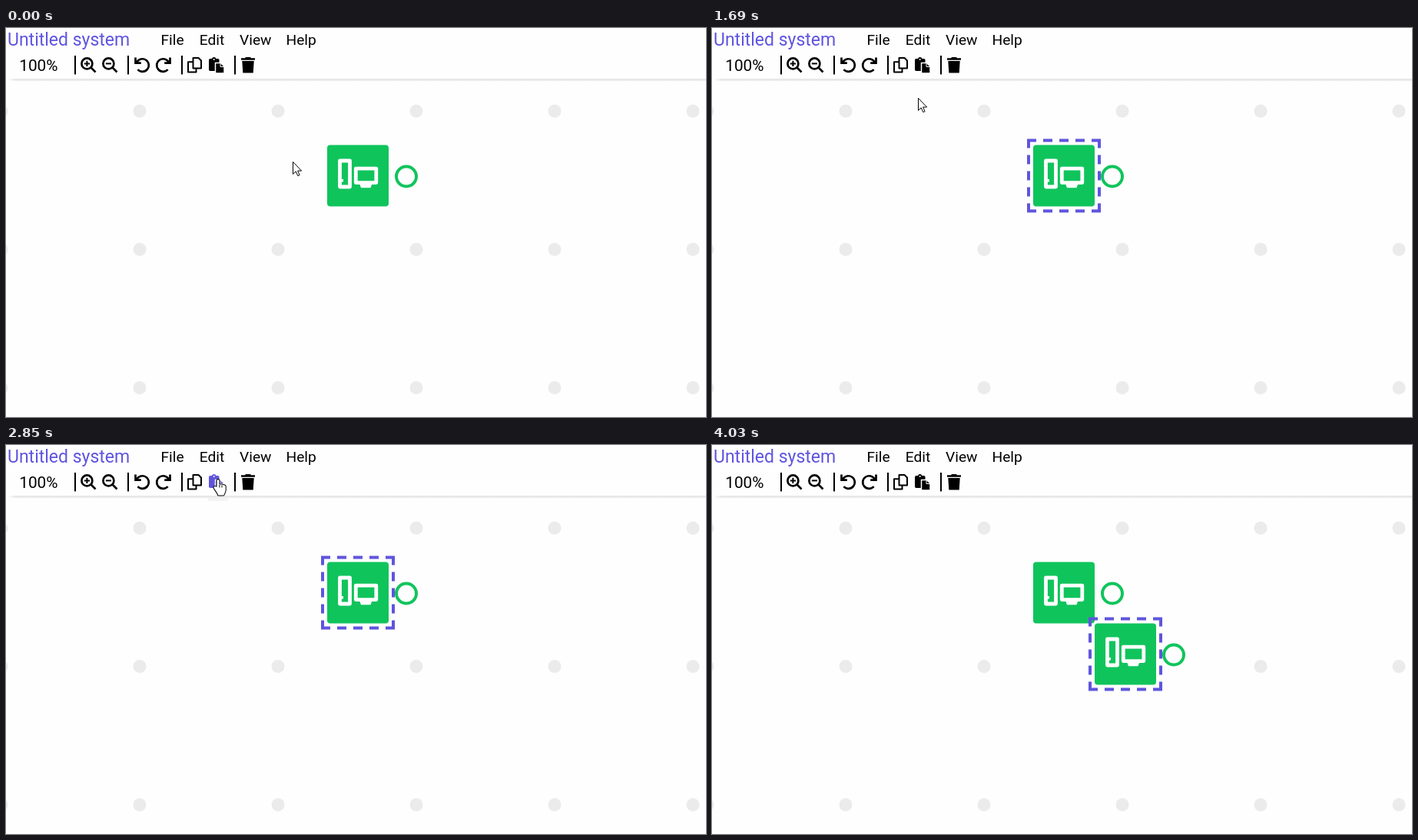
Recreate the animation shown at these times as an HTML page. Size 911 by 507 pixels, loop 5030 ms.

```html
<!DOCTYPE html>
<html lang="en">
<head>
<meta charset="utf-8">
<title>Copy and paste a component</title>
<style>
  html, body { margin: 0; width: 100%; height: 100%; overflow: hidden; background: #fefefe; }
  svg { display: block; }
  text { font: 19.2px Roboto, Arial, sans-serif; }
  .title { font-size: 23px; fill: #5f55e0; }
  .zoom { font-size: 20.8px; }
  .line { fill: none; stroke: currentColor; stroke-width: 2; stroke-linejoin: round; }
  .bold { stroke-width: 2.7; stroke-linejoin: miter; }
  .ink, .paper { fill: #fff; stroke: #000; stroke-width: 5; stroke-linecap: round; stroke-linejoin: round; }
  .paper { stroke: #fff; stroke-width: 3; }
  #move .ink { stroke-width: 4; }
  #move .paper { stroke-width: 2; }
</style>
</head>
<body>
<svg width="911" height="507">
  <defs>
    <pattern id="dots" x="84" y="18.3" width="180" height="180.3" patternUnits="userSpaceOnUse">
      <circle cx="90" cy="90" r="8.5" fill="#ebebeb"/>
    </pattern>
    <linearGradient id="edge">
      <stop stop-color="#e8e8e8" stop-opacity="0"/>
      <stop offset=".01" stop-color="#e8e8e8"/>
    </linearGradient>
    <g id="lens" class="line bold">
      <circle cx="8.4" cy="8.4" r="7"/>
      <path d="M13 13l6.5 6.500"/>
    </g>
    <path id="turn" class="line bold" d="M4.400 16.200A8.300 8.300 0 1 0 3.200 6.600M1.500 .6V7.600H8.800"/>
    <g id="node">
      <rect x="418" y="152.500" width="80" height="80" rx="4" fill="#10c45c"/>
      <g fill="none" stroke="#fff" stroke-width="4.800" stroke-linejoin="round">
        <path d="M434.500 173h13v34h-13z"/>
        <path d="M455.300 183.200h26.500v18.400h-26.500z"/>
      </g>
      <path d="M436 197h3v3.500h-3zM460.500 204h15.500l-1.500 4.300h-12.500z" fill="#fff"/>
    </g>
    <circle id="port" cx="521" cy="193.500" r="13" fill="#fefefe" stroke="#10c45c" stroke-width="4"/>
    <path id="frame" d="M410 146.500h96M410 238.500h96M412 144.500v96M504 144.500v96"
          fill="none" stroke="#5f55dd" stroke-width="4" stroke-dasharray="12 9"/>
    <path id="fingers" d="M0 2.400V13L-4 11.500 1 19V20H6.500L8.200 15V10L4 9H0"/>
    <path id="arrows" d="M-9 0H9M0-9V9M-2.500-6.500 0-9 2.500-6.500M-2.500 6.500 0 9 2.500 6.500M-6.500-2.500-9 0-6.500 2.500M6.500-2.500 9 0 6.500 2.500"/>
  </defs>

  <rect width="911" height="507" fill="url(#dots)"/>

  <text class="title" x="2" y="23">Untitled system</text>
  <text x="201.500" y="22">File</text>
  <text x="251.800" y="22">Edit</text>
  <text x="304" y="22">View</text>
  <text x="364.500" y="22">Help</text>
  <text class="zoom" x="17.200" y="56">100%</text>
  <path d="M90 36v24.500M159 36v24.500M229 36v24.500M298 36v24.500" stroke="#000" stroke-width="2"/>
  <rect x="3" y="66" width="908" height="2.800" fill="url(#edge)"/>

  <g transform="translate(97 38)"><use href="#lens"/><path class="line" d="M4.800 8.400h7.200M8.400 4.800v7.200"/></g>
  <g transform="translate(125 38)"><use href="#lens"/><path class="line" d="M4.800 8.400h7.200"/></g>
  <use href="#turn" transform="translate(167 38)"/>
  <use href="#turn" transform="translate(215 38) scale(-1 1)"/>

  <rect id="copyBg" x="235" y="69" width="32" height="4" fill="#f4f4f4"/>
  <path id="copy" class="line" transform="translate(236 38)"
        d="M7.500 1H14.500L18 4.500V14.500H7.500zM7 6.200H1V19.500H11.500V15"/>
  <rect id="pasteBg" x="263" y="69" width="26" height="4" fill="#f4f4f4"/>
  <g id="paste" transform="translate(264 38)" fill="currentColor">
    <rect y="2" width="13.500" height="16" rx="1.800"/>
    <circle cx="6.700" cy="2.600" r="2.600"/>
    <circle cx="6.700" cy="3" r="1" fill="#fefefe"/>
    <path d="M8.500 7.500h7l4.500 4.500v9H8.500z" stroke="#fefefe" stroke-width="1.500"/>
    <path d="M15 8v4.500h5" fill="none" stroke="#fefefe"/>
  </g>
  <path transform="translate(306 38)" d="M0 1.300H5L6 0h6l1 1.300h5v2.500H0zM1.300 5h15.400l-1 15.600H2.300z"/>

  <use href="#node"/>
  <use href="#frame" id="firstFrame"/>
  <use href="#port"/>
  <g id="pasted" transform="translate(80 80)">
    <use href="#node"/>
    <use href="#frame"/>
    <use href="#port"/>
  </g>

  <g id="pointer">
    <path id="arrow" d="M.5.5V16.500l3.700-3.500 2.600 5.700 2.300-1-2.500-5.600h5z" fill="#fff" stroke="#000"/>
    <g id="hand">
      <use href="#fingers" class="ink"/><use href="#fingers" class="paper"/>
      <path d="M1.900 8v3.500M5 8.500v3" stroke="#000"/>
    </g>
    <g id="move"><use href="#arrows" class="ink"/><use href="#arrows" class="paper"/></g>
  </g>
</svg>
<script>
const LOOP = 5030, SELECT = 1020, PASTE = 3070, LEAVE = 4030, TOOLBAR = 67;
const home = { x: 373, y: 174 };
// Each leg eases the pointer from where it is to a new place
const legs = [
  { from: 480, to: 830, x: 447, y: 176 },
  { from: 1190, to: 1690, x: 268, y: 91 },
  { from: 1690, to: 1900, x: 246, y: 47 },
  { from: 2290, to: 2430, x: 255, y: 93 },
  { from: 2450, to: 2820, x: 276, y: 44 },
  { from: PASTE, to: 3490, x: 344, y: 188 },
  { from: 3520, to: LEAVE, x: 527, y: 478 }
];

const el = id => document.getElementById(id);
const show = (id, on) => el(id).style.display = on ? '' : 'none';
const clamp = v => Math.min(1, Math.max(0, v));
const ease = u => u * u * (3 - 2 * u);

function pointerAt(t) {
  let { x, y } = home;
  for (const leg of legs) {
    const u = ease(clamp((t - leg.from) / (leg.to - leg.from)));
    x += (leg.x - x) * u;
    y += (leg.y - y) * u;
  }
  return { x, y };
}

// Button highlight fades in from `on` and out from `off`
function hover(id, t, on, off) {
  const p = clamp((t - on) / 110) * (1 - clamp((t - off) / 130));
  el(id).style.color = `rgb(${95 * p}, ${85 * p}, ${221 * p})`;
  el(id + 'Bg').style.opacity = p;
}

function draw(now) {
  const t = now % LOOP;
  const { x, y } = pointerAt(t);
  const kind = y < TOOLBAR ? 'hand' : x >= 418 && y < 232 ? 'move' : 'arrow';
  for (const id of ['arrow', 'hand', 'move']) show(id, id === kind);
  el('pointer').setAttribute('transform', `translate(${x} ${y})`);
  show('pointer', t < LEAVE);
  show('firstFrame', t >= SELECT && t < PASTE);
  show('pasted', t >= PASTE);
  hover('copy', t, 1790, 2350);
  hover('paste', t, 2690, 3160);
  requestAnimationFrame(() => draw(performance.now() - start));
}

const start = performance.now();
draw(0);
</script>
</body>
</html>
```
